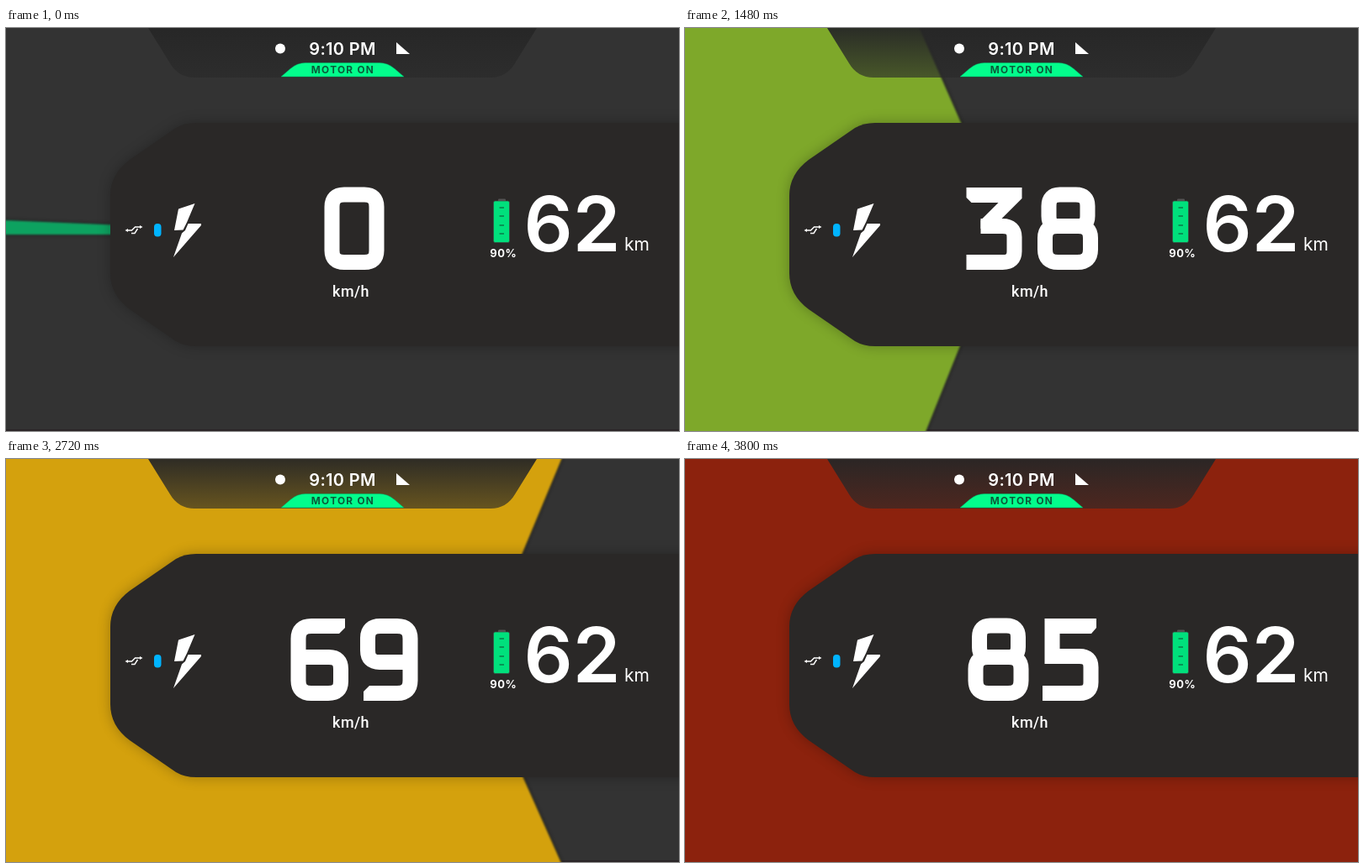
An HTML page for the animation above (5600 ms loop, 800 px wide and 480 px high).

```html
<!DOCTYPE html>
<html lang="en">
<head>
<meta charset="utf-8">
<title>Ride dashboard</title>
<style>
html, body { margin: 0; width: 100%; height: 100%; overflow: hidden; background: #333; }
svg { display: block; width: 100vw; height: 100vh; }
text { font-family: Inter, "Open Sans", sans-serif; fill: #fff; }
.mid { text-anchor: middle; }
</style>
</head>
<body>
<svg viewBox="0 0 800 480" xmlns="http://www.w3.org/2000/svg">
  <defs>
    <linearGradient id="barFill" x1="0" y1="0" x2="0" y2="1">
      <stop offset="0" stop-color="#262626" stop-opacity=".95"/>
      <stop offset="1" stop-color="#292929" stop-opacity=".64"/>
    </linearGradient>
    <filter id="soft" x="-10%" y="-15%" width="120%" height="130%"><feGaussianBlur stdDeviation="8"/></filter>
    <filter id="edge" filterUnits="userSpaceOnUse" x="-20" y="-20" width="840" height="520"><feGaussianBlur stdDeviation="2"/></filter>
    <filter id="rim" filterUnits="userSpaceOnUse" x="-20" y="-20" width="840" height="520"><feGaussianBlur stdDeviation=".9"/></filter>
    <path id="panel" d="M830 113H226Q212 113 202 119L147 157Q124 174 124 200V292Q124 318 147 335L202 373Q212 379 226 379H830Z"/>
    <path id="bar" d="M169 0L195 42Q205 59 224 59H576Q595 59 605 42L631 0Z"/>
  </defs>

  <rect width="800" height="480" fill="#333"/>
  <rect y="478" width="800" height="2" fill="#2b2527"/>
  <path id="wedgeShade" filter="url(#edge)" fill="none" stroke="#000" stroke-opacity=".25" stroke-width="4"/>
  <path id="wedge" filter="url(#rim)"/>

  <use href="#panel" filter="url(#soft)" opacity=".26"/>
  <use href="#panel" fill="#2a2827"/>

  <use href="#bar" fill="url(#barFill)"/>
  <circle cx="326" cy="24.5" r="6" fill="#fff"/>
  <text class="mid" x="400" y="31.5" font-size="20" font-weight="600" letter-spacing=".3">9:10 PM</text>
  <path d="M464 17V31H480Z" fill="#fff"/>
  <path d="M327 58L338 48.500Q346 41.500 356 41.500H444Q454 41.500 462 48.500L473 58Z" fill="#03fd8c" stroke="#07a463" stroke-opacity=".5"/>
  <text class="mid" x="400.5" y="54.300" font-size="11.8" font-weight="700" letter-spacing="1.3" style="fill:#0b5a3a">MOTOR ON</text>

  <path d="M144 241H149.500L153.500 237H160M149 244.500H153L156.500 239" fill="none" stroke="#fff" stroke-width="1.400"/>
  <path d="M141.500 241L145 239V243ZM162.500 237L159 235V239Z" fill="#fff"/>
  <rect x="176" y="233" width="8.500" height="15.500" rx="4" fill="#00b4ff"/>
  <path d="M205 215.500L224.500 209L215 231.500L210.500 240.500L200 241ZM216.500 233H232V235L199 273L209 244.500L213 241Z" fill="#fff"/>

  <g id="speed" fill="#fff"></g>
  <text class="mid" x="410" y="320" font-size="18" font-weight="500" letter-spacing=".4" style="font-family:Roboto,'Noto Sans',sans-serif">km/h</text>

  <rect x="585" y="203.500" width="9" height="4" rx="1" fill="#555"/>
  <rect x="579.500" y="206" width="19" height="49.500" rx="2" fill="#00e07c" stroke="#3b4a42" stroke-opacity=".7"/>
  <path d="M586.500 214H592M586.500 224H592M586.500 235H592M586.500 245H592" stroke="#0a7a48" stroke-width="1.300"/>
  <text class="mid" x="591.3" y="273.300" font-size="13" font-weight="700" letter-spacing=".6">90%</text>
  <text x="615.500" y="266" font-size="91" font-weight="600">62</text>
  <text x="735" y="265" font-size="21" font-weight="400">km</text>
</svg>
<script>
const LOOP = 5600, STEP = 40, MID = 246, FAR = 1500;
const el = id => document.getElementById(id);

// time, speed, upper edge angle and apex, lower edge angle and apex, r, g, b
const KEYS = [
  [0, 0, 2.4, 400, 0, 400, 12, 162, 96],
  [600, 15, 40, 243, 37.8, 240, 52, 163, 74],
  [880, 22, 55.9, 289, 57.9, 263, 76, 164, 60],
  [1480, 38, 66.3, 386.5, 68.2, 380, 126, 168, 44],
  [1880, 50, 81.6, 434, 84.9, 428, 157, 173, 29],
  [2360, 62, 100, 499.5, 102.3, 496, 199, 175, 16],
  [3000, 75, 121.8, 612.5, 122.6, 610, 208, 138, 4],
  [3600, 83.4, 140, 770, 140, 768, 140, 32, 8],
  [3640, 84, 140, 770, 140, 768, 140, 32, 8],
  [3800, 85, 140, 770, 140, 768, 140, 32, 8]
];

// Each digit: left bearing, width, right bearing, stroked path, filled path
const SIX = "M58 10H25Q9.500 10 9.500 25V75Q9.500 90 25 90H45Q60 90 60 76V61Q60 47 46 47H10";
const SIX_TIP = "M57 1H65V12L58 19H57Z";
const DIGITS = [
  [9, 72, 9, "M24 9.500H48Q62.500 9.500 62.500 24V76Q62.500 90 48 90H24Q9.500 90 9.500 76V24Q9.500 9.500 24 9.500Z", ""],
  [6, 40, 8, "M6 10H30.500V99", "M0 1H8V19H6L0 13Z"],
  [5, 70, 5, "M8 10H47Q60.500 10 60.500 22V25Q60.500 34 54 39.500L9.500 78V99M0 90H70", "M2 1H9V19H8L2 13Z"],
  [6, 66, 8, "M7 10H60M17 47H43Q57 47 57 60V77Q57 90 43 90H0", "M0 1H66V14L42 38L32 50H17V40L38 19H6L0 13Z"],
  [5, 74, 6, "M37 1L10 59V73H74M54 42V99", ""],
  [8, 67, 10, "M57 10H11.500V46H44Q57.500 46 57.500 59V77Q57.500 90 44 90H0", "M56 1H64V12L58 19H56Z"],
  [8, 69, 7, SIX, SIX_TIP],
  [5, 67, 5, "", "M0 1H67V20L35 99H13L46 19H6L0 13Z"],
  [10, 73, 8, "M27 9.500H46Q60 9.500 60 23V35Q60 47 48 47H25Q14 47 14 35V23Q14 9.500 27 9.500ZM24 47H49Q63.500 47 63.500 61V75Q63.500 90 48 90H25Q9.500 90 9.500 75V61Q9.500 47 24 47Z", ""],
  [7, 69, 8, SIX, SIX_TIP]
];

function sample(t) {
  const last = KEYS.length - 1;
  if (t >= KEYS[last][0]) return KEYS[last];
  const i = KEYS.findIndex((k, n) => n < last && t < KEYS[n + 1][0]);
  const a = KEYS[i], b = KEYS[i + 1];
  const p = KEYS[Math.max(i - 1, 0)], q = KEYS[Math.min(i + 2, last)];
  const h = b[0] - a[0], u = (t - a[0]) / h;
  return a.map((v, c) => {
    const m0 = (b[c] - p[c]) / (b[0] - p[0]) * h;
    const m1 = (q[c] - v) / (q[0] - a[0]) * h;
    const d = b[c] - v;
    return v + u * (m0 + u * (3 * d - 2 * m0 - m1 + u * (m0 + m1 - 2 * d)));
  });
}

function edgeEnd(angle, apex, side) {
  const r = angle * Math.PI / 180;
  return [apex - FAR * Math.cos(r), MID + side * FAR * Math.sin(r)];
}

function drawWedge([, , upA, upX, lowA, lowX, ...rgb]) {
  const up = edgeEnd(upA, upX, -1), low = edgeEnd(lowA, lowX, 1);
  const d = `M-2000 ${up[1]}L${up}L${upX} ${MID}L${lowX} ${MID}L${low}L-2000 ${low[1]}Z`;
  el("wedge").setAttribute("d", d);
  el("wedge").setAttribute("fill", `rgb(${rgb.map(Math.round)})`);
  el("wedgeShade").setAttribute("d", d);
}

let shown = -1;
function drawSpeed(value) {
  if (value === shown) return;
  shown = value;
  const chars = [...String(value)].map(Number);
  const total = chars.reduce((sum, n) => sum + DIGITS[n][0] + DIGITS[n][1] + DIGITS[n][2], 0);
  let x = 414 - total / 2;
  el("speed").innerHTML = chars.map(n => {
    const [left, width, right, line, fill] = DIGITS[n];
    const turn = n === 9 ? ` rotate(180 ${width / 2} 50)` : "";
    const g = `<g transform="translate(${x + left} 189)${turn}">` +
      `<path d="${line}" fill="none" stroke="#fff" stroke-width="18"/><path d="${fill}"/></g>`;
    x += left + width + right;
    return g;
  }).join("");
}

function draw(time) {
  const t = Math.floor(time % LOOP / STEP) * STEP;
  const state = sample(t);
  drawWedge(state);
  drawSpeed(Math.floor(state[1]));
}

const start = performance.now();
function tick() {
  draw(performance.now() - start);
  requestAnimationFrame(tick);
}
tick();
</script>
</body>
</html>
```
